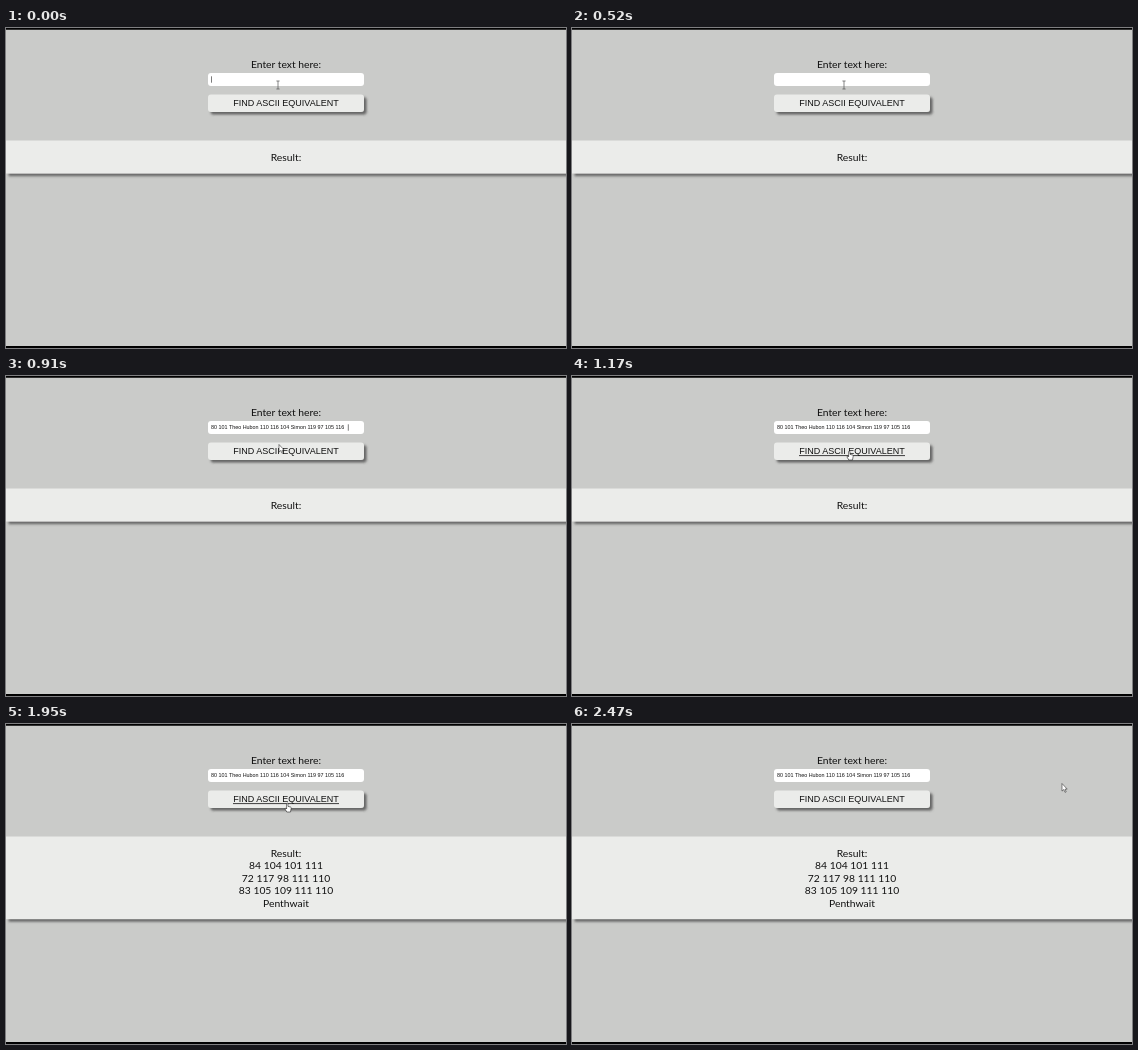
Recreate the animation shown at these times as an HTML page. Size 560x320 px, loop 2.6 s.

```html
<!DOCTYPE html>
<html lang="en">
<head>
<meta charset="utf-8">
<title>ASCII equivalent</title>
<style>
  html, body { margin: 0; width: 100%; height: 100%; overflow: hidden; background: #cacbc9; }
  svg { display: block; width: 560px; height: 320px; }
  text { fill: #111; text-anchor: middle; }
  .label { font: 10.33px Lato, sans-serif; }
  .button { font: 9px "Liberation Sans", Arial, sans-serif; }
  .entry { font: 5.4px "Liberation Sans", Arial, sans-serif; text-anchor: start; }
</style>
</head>
<body>
<svg viewBox="0 0 560 320">
  <defs>
    <filter id="shadow" filterUnits="userSpaceOnUse" x="-10" y="55" width="590" height="160">
      <feDropShadow dx="2.6" dy="2.6" stdDeviation="1.3" flood-color="#444" flood-opacity=".75"/>
    </filter>
  </defs>
  <rect width="560" height="320" fill="#cacbc9"/>
  <text class="label" x="280" y="39.7">Enter text here:</text>
  <rect x="202" y="45" width="156" height="13" rx="3" fill="#fff"/>
  <text class="entry" id="entry" x="205" y="53"></text>
  <path id="caret" stroke="#222" stroke-width=".6"/>
  <rect x="202" y="66.5" width="156" height="17.5" rx="3" fill="#ebecea" filter="url(#shadow)"/>
  <text class="button" x="280" y="78.2">FIND ASCII EQUIVALENT</text>
  <path id="underline" d="M227 79.6H333" stroke="#111" stroke-width=".8"/>
  <rect id="panel" y="112.5" width="560" fill="#ebecea" filter="url(#shadow)"/>
  <text class="label" x="280" y="133">Result:</text>
  <g id="result" class="label"></g>
  <path d="M0 .75H560M0 319H560" stroke="#000" stroke-width="2"/>
  <g id="cursor" stroke-linejoin="round">
    <path id="beam" d="M-1.6 -4H1.6M0 -4V4M-1.6 4H1.6" fill="none" stroke="#555" stroke-width=".7"/>
    <path id="arrow" d="M0 0V7.6L1.8 6L3 8.8L4.2 8.3L3 5.6H5.2Z" fill="#fff" stroke="#333" stroke-width=".6"/>
    <path id="hand" d="M-1.4 -4.5Q-.7 -5.3 0 -4.5V-1.6L2.6 -1Q3.3 -.7 3.2 .2L2.5 4H-1.2L-3 1Q-3 0 -2.2 .2L-1.4 1Z"
      fill="#fff" stroke="#222" stroke-width=".6"/>
  </g>
</svg>
<script>
const $ = id => document.getElementById(id);
const STEP = 130, LOOP = 2600, LINE = 12.4;
const ENTRY = "80 101 Theo Hubon 110 116 104 Simon 119 97 105 116";
const codes = word => [...word].map(c => c.charCodeAt(0)).join(" ");
const lines = [codes("Theo"), codes("Hubon"), codes("Simon"), "Penthwait"];

// start time, pointer shape, x, y
const pointer = [
  [0, "beam", 272, 57],
  [780, "beam", 272, 60],
  [910, "arrow", 273, 68.5],
  [1040, "hand", 276, 78],
  [1170, "hand", 278, 80],
  [1690, "hand", 279, 81],
  [1820, "hand", 281, 83],
  [1950, "hand", 282, 84],
  [2210, "arrow", 372, 80],
  [2340, "arrow", 452, 67],
  [2470, "arrow", 490, 59.5]
];

$("entry").textContent = ENTRY;
$("result").innerHTML = lines
  .map((line, i) => `<text x="280" y="${133 + LINE * (i + 1)}">${line}</text>`).join("");

const show = (id, on) => $(id).setAttribute("visibility", on ? "visible" : "hidden");

function draw(time) {
  const t = Math.floor((time % LOOP) / STEP) * STEP;
  const pasted = t >= 650, solved = t >= 1560;
  const [, shape, x, y] = pointer.filter(p => p[0] <= t).pop();

  show("entry", pasted);
  show("caret", t < 260 || (pasted && t < 1040));
  $("caret").setAttribute("d", `M${pasted ? 342.3 : 205.5} 48.3V54.7`);
  show("underline", shape === "hand");
  show("result", solved);
  $("panel").setAttribute("height", 33 + (solved ? LINE * lines.length : 0));
  $("cursor").setAttribute("transform", `translate(${x} ${y})`);
  for (const id of ["beam", "arrow", "hand"]) show(id, id === shape);
}

const start = performance.now();
function tick() {
  draw(performance.now() - start);
  requestAnimationFrame(tick);
}
tick();
</script>
</body>
</html>
```
